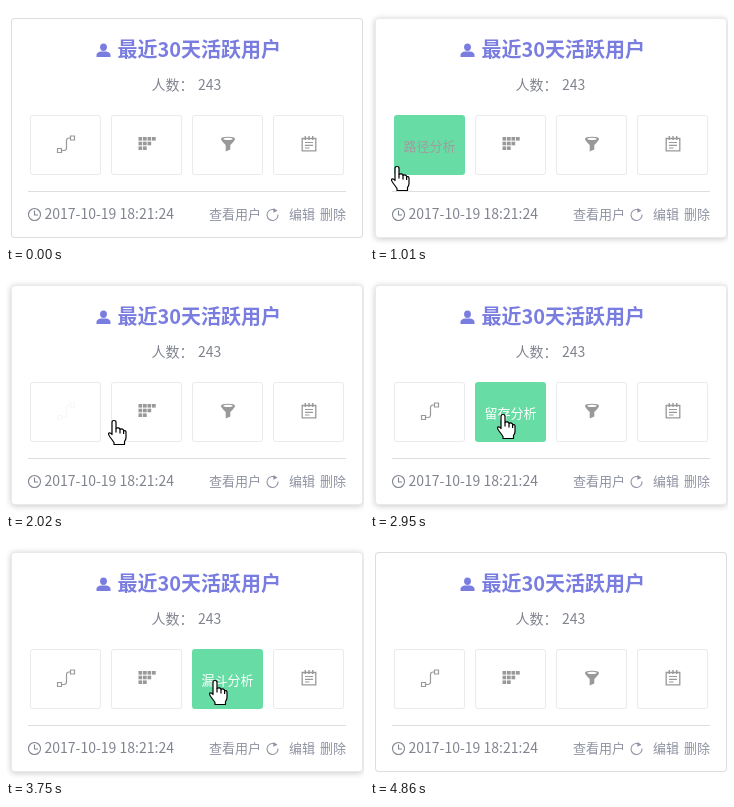
An HTML page with a canvas that plays this animation: 358 by 239 pixels, repeating every 5410 ms.

```html
<!DOCTYPE html>
<html lang="zh-CN">
<head>
<meta charset="utf-8">
<style>
  html, body { margin: 0; width: 100%; height: 100%; overflow: hidden; background: #fff; }
  canvas { display: block; }
</style>
</head>
<body>
<canvas id="stage" width="358" height="239"></canvas>
<script>
const ctx = document.getElementById('stage').getContext('2d');
const LOOP = 5410, FADE = 150;
const FONT = '"Noto Sans CJK SC", "Noto Sans CJK", "Noto Sans", sans-serif';
const PURPLE = '#7a7de0', GREEN = '#68dca5', TEXT = '#80848f', LINK = '#8f92a2';

// Pointer positions, each held until the next: time, x, y (no x: hidden)
const POINTER = [
  [0], [860, 9, 178], [940, 16, 170], [1010, 27, 160], [1100, 42, 150], [1170, 52, 145],
  [1710, 55, 145], [1790, 64, 146], [1860, 76, 147], [1940, 90, 147], [2020, 108, 147],
  [2090, 113, 147], [2170, 115, 147], [2260, 116, 147], [2950, 133, 141], [3040, 152, 142],
  [3120, 178, 143], [3200, 192, 142], [3280, 205, 141], [3440, 205, 141], [3750, 209, 140],
  [3830, 221, 140], [3910, 236, 140], [3990, 253, 140], [4070, 298, 140], [4140, 302, 140],
  [4230, 303, 140], [4630, 346, 142], [4700], [4780], [4860]
];

const TILES = [
  { x: 24, label: '路径分析', enter: 990, leave: 1995, icon: pathIcon },
  { x: 105, label: '留存分析', enter: 2025, leave: 3100, icon: blocksIcon },
  { x: 186, label: '漏斗分析', enter: 3190, leave: 4010, icon: funnelIcon },
  { x: 267, label: '事件分析', enter: 4050, leave: 4625, icon: notesIcon }
];

const HAND = new Path2D('M-2 14V2Q-2 0 0 0T2 2V8Q3 7 4.5 7.4T6 9Q7 8 8.4 8.6T9.6 10.2' +
  'Q12 9.6 12 12V17Q12 19 10.5 21V24H0V22Q-2 19 -4 16.5Q-6 14 -5.4 12.8Q-4 11.5 -2 14Z');
const KNUCKLES = new Path2D('M2 8V12M6 9V13M9.6 10.2V13.5');

function progress(t, start) {
  const p = Math.min(1, Math.max(0, (t - start) / FADE));
  return p * p * (3 - 2 * p);
}

function hoverAmount(t, enter, leave) {
  return t < leave ? progress(t, enter) : 1 - progress(t, leave);
}

function gray(amount) {
  const v = Math.round(153 + 102 * amount);
  return `rgb(${v},${v},${v})`;
}

function text(str, x, y, size, color, weight = 400, align = 'left') {
  ctx.font = `${weight} ${size}px ${FONT}`;
  ctx.textAlign = align;
  ctx.fillStyle = color;
  ctx.fillText(str, x, y);
}

function stroke(d, color, width = 1) {
  ctx.strokeStyle = color;
  ctx.lineWidth = width;
  ctx.stroke(new Path2D(d));
}

function fill(d, color) {
  ctx.fillStyle = color;
  ctx.fill(new Path2D(d));
}

function box(x, y, w, h, r, border, background) {
  ctx.beginPath();
  ctx.roundRect(x, y, w, h, r);
  ctx.fillStyle = border;
  ctx.fill();
  ctx.shadowColor = 'transparent';
  ctx.beginPath();
  ctx.roundRect(x + 1, y + 1, w - 2, h - 2, r - 1);
  ctx.fillStyle = background;
  ctx.fill();
}

// Tile icons are drawn around the origin
function pathIcon(color) {
  stroke('M-8.5 4.5h4v4h-4zM4.5 -8h4v4h-4zM-4 6.5h2q2.5 0 2.5 -2.5v-7.5q0 -2.5 2.5 -2.5h1.5', color, 1.2);
}

function blocksIcon(color) {
  ctx.fillStyle = color;
  for (let row = 0; row < 3; row++)
    for (let col = 0; col < 4 - row; col++)
      ctx.fillRect(-8.5 + col * 4.5, -7 + row * 4.7, 3.7, 3.6);
}

function funnelIcon(color) {
  fill('M-7 -5Q-7 -7.3 0 -7.3T7 -5Q7 -3.5 2.3 1V5.5L-2.3 7.5V1Q-7 -3.5 -7 -5Z', color);
  fill('M-4.8 -5Q-4 -6.2 0 -6.2T4.8 -5Q4 -3.9 0 -3.9T-4.8 -5Z', '#fff');
}

function notesIcon(color) {
  stroke('M-6.8 -5.5h13.6v12.3h-13.6z', color, 1.3);
  stroke('M-3.7 -8v4M0 -8v4M3.7 -8v4', color, 1.4);
  stroke('M-4 -1.5h8M-4 1.3h8M-4 4h4.5', color, 1.2);
}

function drawCard(hover) {
  ctx.save();
  ctx.shadowColor = `rgba(0,0,0,${0.22 * hover})`;
  ctx.shadowBlur = 6;
  ctx.shadowOffsetY = hover;
  const edge = Math.round(221 + 13 * hover);
  box(5, 12, 352, 220, 4, `rgb(${edge},${edge},${edge + 3})`, '#fff');
  ctx.restore();
}

function drawHeader() {
  ctx.fillStyle = PURPLE;
  ctx.beginPath();
  ctx.ellipse(97.5, 41.3, 3.4, 3.7, 0, 0, 7);
  ctx.fill();
  fill('M90.5 51v-2q0 -2.5 4 -3.5h6q4 1 4 3.5v2z', PURPLE);
  text('最近30天活跃用户', 111.5, 51, 20, PURPLE, 700);
  text('人数：', 145.5, 84, 14, TEXT);
  text('243', 192, 84, 14, TEXT);
}

function drawFooter() {
  ctx.fillStyle = '#dddee1';
  ctx.fillRect(22, 185, 318, 1);
  ctx.strokeStyle = TEXT;
  ctx.lineWidth = 1.1;
  ctx.beginPath();
  ctx.arc(28.5, 208.5, 6, 0, 7);
  ctx.stroke();
  stroke('M28.5 204.5v4.5h3.5', TEXT, 1.1);
  text('2017-10-19 18:21:24', 38.5, 213, 14, TEXT);
  text('查看用户', 203, 213, 13, LINK);
  ctx.strokeStyle = LINK;
  ctx.lineWidth = 1.1;
  ctx.beginPath();
  ctx.arc(266.5, 209, 5.5, -0.1, 5.2);
  ctx.stroke();
  fill('M267.5 202l4 2.8l-4.2 2z', LINK);
  text('编辑', 283, 213, 13, LINK);
  text('删除', 314, 213, 13, LINK);
}

function drawTile(tile, t) {
  const active = t >= tile.enter && t < tile.leave;
  const color = gray(hoverAmount(t, tile.enter, tile.leave));
  box(tile.x, 109, 71, 60, 3, active ? GREEN : '#ebebee', active ? GREEN : '#fff');
  if (active) {
    text(tile.label, tile.x + 35.5, 145, 13, color, 400, 'center');
    return;
  }
  ctx.save();
  ctx.translate(tile.x + 36, 138);
  tile.icon(color);
  ctx.restore();
}

function drawPointer(x, y) {
  ctx.save();
  ctx.translate(x, y + 0.5);
  ctx.fillStyle = '#fff';
  ctx.strokeStyle = '#000';
  ctx.lineWidth = 1.2;
  ctx.lineJoin = 'round';
  ctx.fill(HAND);
  ctx.stroke(HAND);
  ctx.stroke(KNUCKLES);
  ctx.restore();
}

function render(now) {
  const time = now % LOOP;
  const [t, x, y] = POINTER.findLast(step => step[0] <= time);
  ctx.fillStyle = '#fff';
  ctx.fillRect(0, 0, 358, 239);
  drawCard(hoverAmount(t, 820, 4600));
  drawHeader();
  TILES.forEach(tile => drawTile(tile, t));
  drawFooter();
  if (x !== undefined) drawPointer(x, y);
}

const start = performance.now();
function tick() {
  render(performance.now() - start);
  requestAnimationFrame(tick);
}
tick();
</script>
</body>
</html>
```
